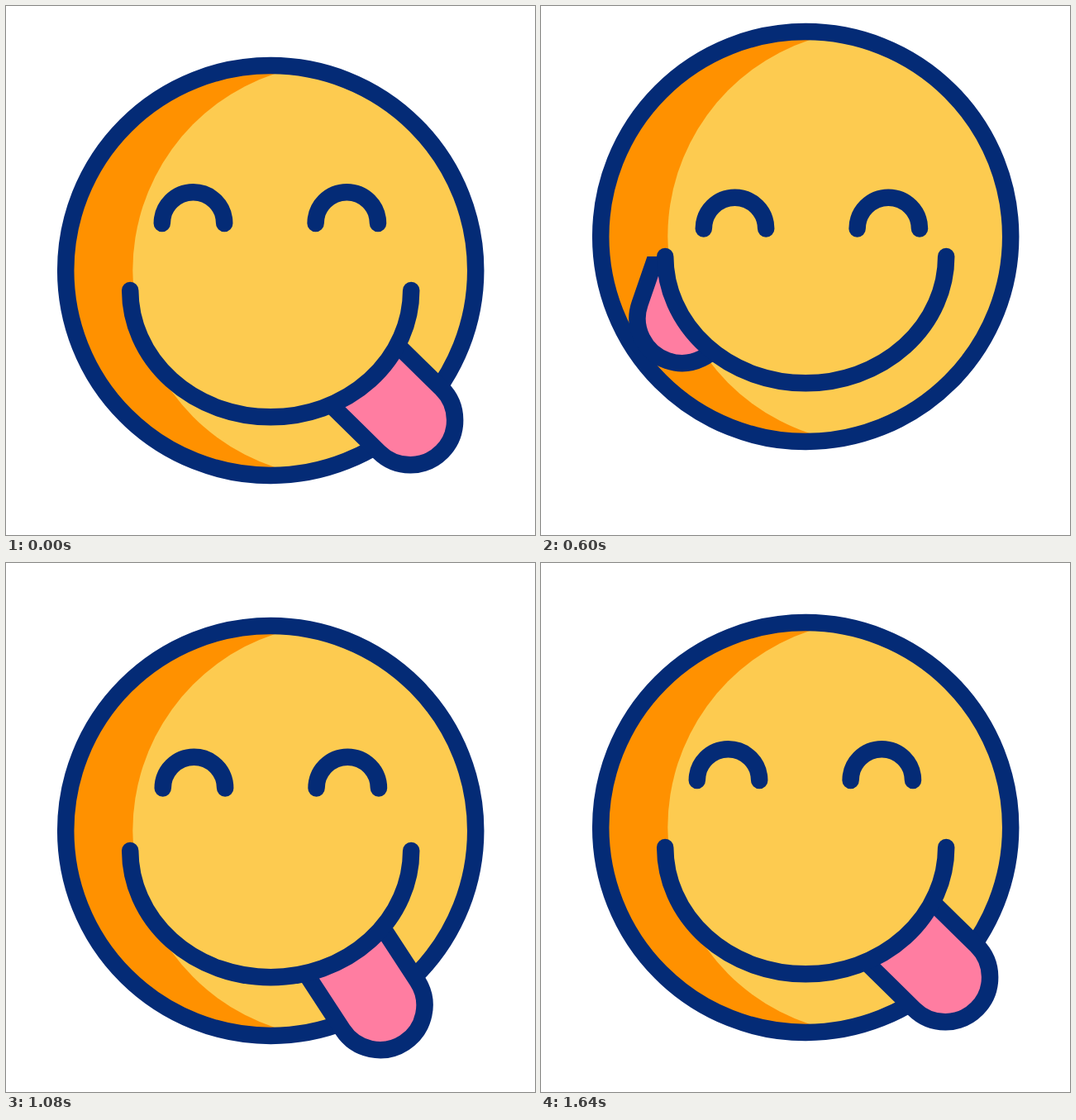
Animation, 640 px wide and 640 px high, one loop 2000 ms. Source, as an HTML page:

```html
<!DOCTYPE html>
<html lang="en">
<head>
<meta charset="utf-8">
<title>Cheeky face</title>
<style>
  html, body { margin: 0; width: 100%; height: 100%; overflow: hidden; background: #fff; }
  svg { display: block; width: 100vw; height: 100vh; }
  .line { stroke: #042b76; stroke-width: 20.5; stroke-linecap: round; }
</style>
</head>
<body>
<svg viewBox="0 0 640 640">
  <defs>
    <clipPath id="below">
      <path d="M-400 24H-170A170 153.3 0 0 0 170 24H400V400H-400Z"/>
    </clipPath>
  </defs>
  <g id="face">
    <circle r="248" fill="#ff9100"/>
    <path d="M5 -238A250.7 250.7 0 0 0 5 238A238 238 0 0 0 5 -238Z" fill="#fdcb50"/>
    <circle class="line" r="248" fill="none"/>
    <g clip-path="url(#below)">
      <path id="tongue" class="line" fill="#ff7da1" d="M-54 -80V220A54 54 0 0 0 54 220V-80"/>
    </g>
    <path class="line" fill="none" d="M-170 24A170 153.3 0 0 0 170 24"/>
    <g id="eyes" class="line" fill="none">
      <path d="M-131.4 -57a37.7 37.7 0 0 1 75.4 0"/>
      <path d="M54.4 -57a37.7 37.7 0 0 1 75.4 0"/>
    </g>
  </g>
</svg>
<script>
const LOOP = 2000, STEP = 40;
const [face, tongue, eyes] = ['face', 'tongue', 'eyes'].map(id => document.getElementById(id));

// Keys are [time, value] pairs.
const bounce = [[0, 0], [600, -41], [1020, 4], [1640, 0]];
const look = [[0, 0], [280, 1], [840, 1], [1145, 0]];
const pull = [[0, 0], [600, 1], [810, 0]];
const swing = [[0, 45.5], [600, -19], [852, 50.4], [1240, 23], [1470, 45.5]];

// Symmetric ease, cubic-bezier(k, 0, 1 - k, 1).
function ease(x, k) {
  let lo = 0, hi = 1;
  for (let i = 0; i < 24; i++) {
    const s = (lo + hi) / 2, r = 1 - s;
    if (3 * k * s * r * r + 3 * (1 - k) * s * s * r + s ** 3 < x) lo = s;
    else hi = s;
  }
  return lo * lo * (3 - 2 * lo);
}

function track(keys, t, k = 1 / 3) {
  for (let i = 1; i < keys.length; i++) {
    const [t0, a] = keys[i - 1], [t1, b] = keys[i];
    if (t < t1) return a + (b - a) * ease((t - t0) / (t1 - t0), k);
  }
  return keys[keys.length - 1][1];
}

const move = (el, x, y, turn = 0) =>
  el.setAttribute('transform', `translate(${x.toFixed(2)} ${y.toFixed(2)}) rotate(${turn.toFixed(2)})`);

function draw(t) {
  const p = track(pull, t, 0.48), e = track(look, t);
  move(face, 320.2, 320 + track(bounce, t, 0.48));
  move(eyes, 8 * e, 47.5 * e);
  move(tongue, 12 - 90 * p, 27 - 136 * p, -track(swing, t));
}

const start = performance.now();
function tick() {
  const t = (performance.now() - start) % LOOP;
  draw(Math.floor(t / STEP) * STEP);
  requestAnimationFrame(tick);
}
tick();
</script>
</body>
</html>
```
